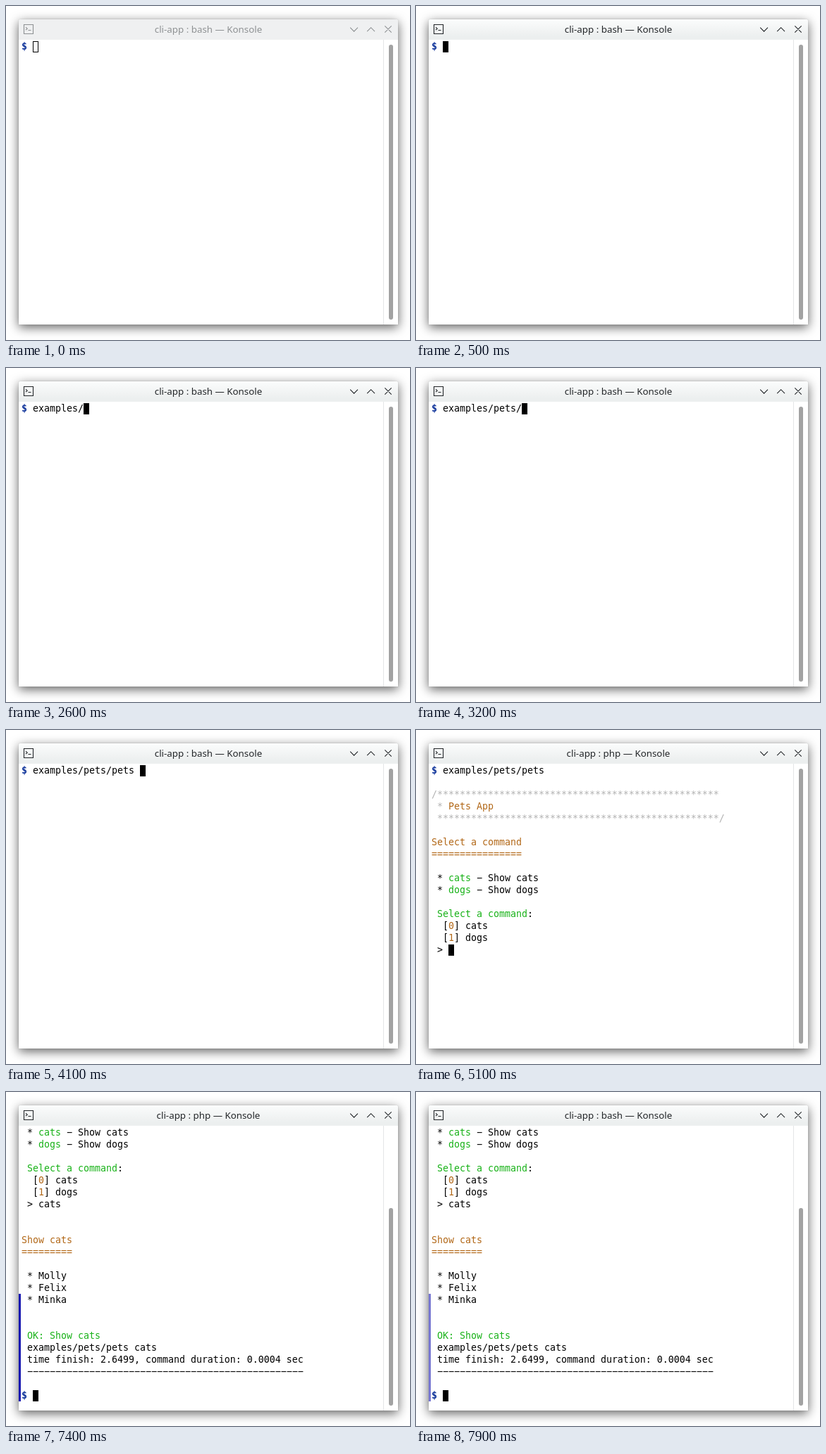
An HTML page for the animation above (8 s loop, 573 px wide and 475 px high).

```html
<!DOCTYPE html>
<html lang="en">
<head>
<meta charset="utf-8">
<title>Terminal</title>
<style>
  html, body { margin: 0; width: 100%; height: 100%; overflow: hidden; background: #fff; }
  .shadow {
    position: absolute; left: 18px; top: 19px; width: 538px; height: 434px;
    border-radius: 3px 3px 0 0;
    box-shadow: 0 0 1px rgba(0,0,0,.45), 0 4px 15px rgba(0,0,0,.62);
  }
  svg { position: absolute; left: 0; top: 0; }
  text { white-space: pre; }
  .title { font: 13.33px "Noto Sans", sans-serif; text-anchor: middle; }
  .term { font: 13.29px "DejaVu Sans Mono", monospace; }
  .icons { fill: none; stroke-width: 1.1; }
</style>
</head>
<body>
<div class="shadow"></div>
<svg width="573" height="475" viewBox="0 0 573 475">
  <defs>
    <linearGradient id="bar" x1="0" y1="0" x2="0" y2="1">
      <stop offset="0" stop-color="#fbfcfc"/>
      <stop offset=".85" stop-color="#ecefef"/>
    </linearGradient>
  </defs>
  <path d="M18 453V22a3 3 0 0 1 3-3H553a3 3 0 0 1 3 3V453Z" fill="#fff"/>
  <path d="M18 48V22a3 3 0 0 1 3-3H553a3 3 0 0 1 3 3V48Z" fill="#eff0f1"/>
  <path id="active" d="M18 48V22a3 3 0 0 1 3-3H553a3 3 0 0 1 3 3V48Z" fill="url(#bar)"/>
  <g id="icons" class="icons">
    <path d="M25.5 26.5h13v13h-13z"/>
    <path d="M28 30.2l2.2 2-2.2 2M31.5 34.5h4"/>
    <path d="M488.2 30.7l5.4 5.4 5.4-5.4M512.2 36.1l5.4-5.4 5.4 5.4M537.3 28.3l9.4 9.4m0-9.4l-9.4 9.4"/>
  </g>
  <text id="title" class="title" x="287" y="38"></text>
  <path d="M535.5 48V453" stroke="#e4e6e7"/>
  <rect id="thumb" x="543" width="6" rx="3" fill="#a2a2a2"/>
  <g id="screen" class="term"></g>
</svg>
<script>
const LOOP = 8000, CELL = 8, LINE = 17, LEFT = 22, TOP = 50;
const BLACK = "#000", BLUE = "#10349a", GRAY = "#b2b2b2", ORANGE = "#b26818", GREEN = "#18b218";
const COMMAND = "examples/pets/pets ";
// [time, characters typed so far]
const TYPING = [[1200, 1], [1400, 2], [1500, 3], [1700, 4], [1800, 5], [1900, 6], [2000, 7], [2100, 8],
  [2600, 9], [2800, 10], [3000, 11], [3200, 14], [3700, 15], [3800, 16], [4100, 19]];

const el = id => document.getElementById(id);
const rect = (x, y, w, h, attrs) => `<rect x="${x}" y="${y}" width="${w}" height="${h}" ${attrs}/>`;
const cells = (row, col, n, fill) =>
  rect(LEFT + col * CELL, TOP + row * LINE, n * CELL, 16, `fill="${fill}"`);
const put = (row, col, text, fill = BLACK, attrs = "") =>
  `<text x="${LEFT + col * CELL}" y="${TOP + 12 + row * LINE}" fill="${fill}" ${attrs}>${text.replace(">", "&gt;")}</text>`;
const prompt = row => put(row, 0, "$", BLUE, 'font-weight="bold"');

function header() {
  const stars = "*".repeat(50);
  return prompt(0) + put(0, 2, COMMAND) +
    put(2, 0, "/" + stars, GRAY) +
    put(3, 1, "*", GRAY) + put(3, 3, "Pets App", ORANGE) +
    put(4, 1, stars + "/", GRAY) +
    put(6, 0, "Select a command", ORANGE) +
    put(7, 0, "=".repeat(16), ORANGE);
}

function menu(top) {
  let out = put(top + 3, 1, "Select a command", GREEN) + put(top + 3, 17, ":");
  ["cats", "dogs"].forEach((pet, i) => {
    out += put(top + i, 1, "*") + put(top + i, 3, pet, GREEN) + put(top + i, 8, "− Show " + pet) +
      put(top + 4 + i, 2, "[") + put(top + 4 + i, 3, String(i), ORANGE) + put(top + 4 + i, 4, "] " + pet);
  });
  return out + put(top + 6, 1, ">");
}

function result() {
  const names = ["Molly", "Felix", "Minka"];
  return put(6, 3, "cats") +
    put(9, 0, "Show cats", ORANGE) + put(10, 0, "=".repeat(9), ORANGE) +
    names.map((name, i) => put(12 + i, 1, "* " + name)).join("") +
    put(17, 1, "OK: Show cats", GREEN) +
    put(18, 1, "examples/pets/pets cats") +
    put(19, 1, "time finish: 2.6499, command duration: 0.0004 sec") +
    put(20, 1, "−".repeat(49)) +
    prompt(22) + cells(22, 2, 1, BLACK);
}

function screen(t) {
  if (t >= 7400) {
    const mark = rect(18, 287, 3, 153, `fill="#1818b2" fill-opacity="${t < 7700 ? 1 : 0.58}"`);
    return mark + menu(0) + result();
  }
  if (t >= 4700) {
    const hint = t < 6500 ? "" :
      cells(15, 4, 3, GRAY) + put(15, 4, "ats") + put(15, 3, "c", GRAY);
    return header() + menu(9) + cells(15, 3, 1, BLACK) + hint;
  }
  const typed = TYPING.reduce((n, [at, count]) => t >= at ? count : n, 0);
  const cursor = t < 300
    ? rect(38.5, 50.5, 7, 15, 'fill="none" stroke="#000"')
    : cells(0, 2 + typed, 1, BLACK);
  return prompt(0) + put(0, 2, COMMAND.slice(0, typed)) + cursor;
}

let shown = "";
function draw(t) {
  const focus = Math.max(0, Math.min(3, Math.floor(t / 100) - 2)) / 3;
  const mix = (a, b) => Math.round(a + (b - a) * focus);
  const ink = `rgb(${mix(142, 35)},${mix(145, 38)},${mix(147, 41)})`;
  el("active").setAttribute("opacity", focus);
  el("icons").setAttribute("stroke", ink);
  el("title").setAttribute("fill", ink);
  el("title").textContent = `cli-app : ${t >= 5100 && t < 7900 ? "php" : "bash"} — Konsole`;

  const thumbTop = t < 7400 ? 55 : 165;
  el("thumb").setAttribute("y", thumbTop);
  el("thumb").setAttribute("height", 446 - thumbTop);

  const next = screen(t);
  if (next !== shown) el("screen").innerHTML = shown = next;
}

const start = performance.now();
function tick() {
  draw((performance.now() - start) % LOOP);
  requestAnimationFrame(tick);
}
tick();
</script>
</body>
</html>
```
